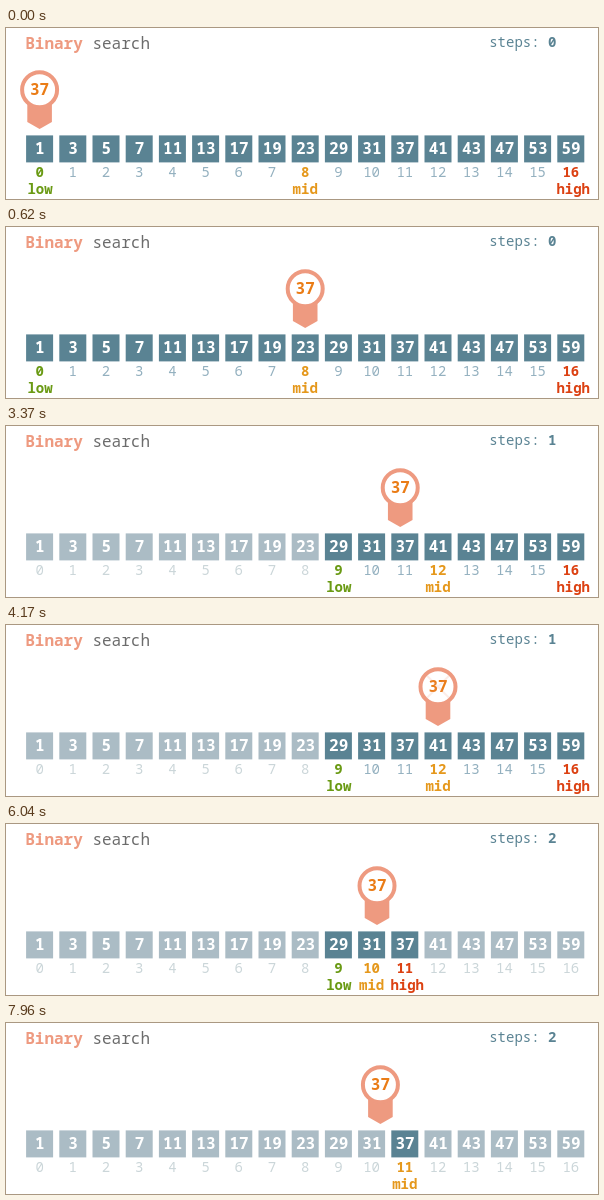
These frames come from a looping animation (592x171 px, 8000 ms). An HTML page:

```html
<!DOCTYPE html>
<html lang="en">
<head>
<meta charset="utf-8">
<title>Binary search</title>
<style>
  html, body { margin: 0; width: 100%; height: 100%; overflow: hidden; background: #fff; }
  svg { display: block; width: 592px; height: 171px; }
  text { font: 14px "Noto Sans Mono", "DejaVu Sans Mono", monospace; white-space: pre; }
  .title { font-size: 16px; fill: #6c6c6c; }
  .title tspan { font-weight: 700; fill: #ee9a80; }
  .steps { fill: #5a8393; }
  .steps tspan { font-weight: 600; }
  .cell rect { fill: #5a8393; }
  .cell text, .pin text { font-size: 16px; font-weight: 600; text-anchor: middle; }
  .cell .value { fill: #fff; }
  .cell .index, .label { font-size: 14px; font-weight: 400; text-anchor: middle; fill: #93b0bf; }
  .cell.off rect { fill: #abbcc5; }
  .cell.off .index { fill: #cbd6d9; }
  .cell.low .index, .cell.mid .index, .cell.high .index, .label { font-weight: 700; }
  .cell.low .index, .label.low { fill: #6a9a14; }
  .cell.high .index, .label.high { fill: #dc4112; }
  .cell.mid .index, .label.mid { fill: #e5981c; }
  .pin text { fill: #ea7c16; }
  .pin .tail { fill: #ee9a80; }
  .pin circle { fill: #fff; stroke: #ee9a80; stroke-width: 4; }
  .pin .cross { stroke: #ee9a80; stroke-width: 2; }
</style>
</head>
<body>
<svg viewBox="0 0 592 171">
  <text class="title" x="19.2" y="21"><tspan>Binary</tspan> search</text>
  <text class="steps" x="483.2" y="19">steps: <tspan id="count">0</tspan></text>
  <g id="cells"></g>
  <g id="labels"></g>
  <g class="pin" id="pin">
    <path class="tail" d="M-12.3 74H12.3V94L0 101L-12.3 94Z"/>
    <circle cy="61.7" r="17.5"/>
    <text y="67.4">37</text>
    <path class="cross" id="cross" d="M-11 50.7L11 72.7M11 50.7L-11 72.7"/>
  </g>
</svg>
<script>
const LOOP = 8000, FPS = 24;
const values = [1, 3, 5, 7, 11, 13, 17, 19, 23, 29, 31, 37, 41, 43, 47, 53, 59];

// Each state takes over at its frame.
const states = [
  { at: 0, steps: 0, low: 0, mid: 8, high: 16 },
  { at: 39, steps: 1, low: 9, mid: 12, high: 16 },
  { at: 110, steps: 2, low: 9, mid: 10, high: 11 },
  { at: 170, steps: 2, low: 11, mid: 11, high: 11 }
];
const moves = [
  { at: 0, length: 15, from: 0, to: 8 },
  { at: 74, length: 15, from: 8, to: 12 },
  { at: 135, length: 14, from: 12, to: 10 },
  { at: 189, length: 14, from: 10, to: 11 }
];
const crosses = [
  { at: 29, length: 10 },
  { at: 99, length: 11 },
  { at: 159, length: 11 }
];

const byId = id => document.getElementById(id);
const centre = i => 33.6 + 33.2 * i;
const easeOut = p => 1 - (1 - p) ** 2;
const latest = (list, frame) => list.filter(item => item.at <= frame).pop();

function add(parent, tag, attrs, text = "") {
  const node = document.createElementNS("http://www.w3.org/2000/svg", tag);
  for (const key in attrs) node.setAttribute(key, attrs[key]);
  node.textContent = text;
  return parent.appendChild(node);
}

const cells = values.map((value, i) => {
  const cell = add(byId("cells"), "g", { class: "cell" });
  const x = centre(i);
  add(cell, "rect", { x: x - 13.5, y: 107.4, width: 27, height: 27 });
  add(cell, "text", { class: "value", x: x + 0.3, y: 126.4 }, value);
  add(cell, "text", { class: "index", x, y: 149.4 }, i);
  return cell;
});
const shifts = { low: 0.4, mid: 0, high: 2.4 };
const labels = {};
for (const name in shifts) {
  labels[name] = add(byId("labels"), "text", { class: "label " + name, y: 166 }, name);
}

let shown = null;
function showState(state) {
  if (state === shown) return;
  shown = state;
  const { low, mid, high } = state;
  byId("count").textContent = state.steps;
  cells.forEach((cell, i) => {
    const role = i === mid ? "mid" : i === low ? "low" : i === high ? "high" : "";
    cell.setAttribute("class", `cell ${role} ${i < low || i > high ? "off" : ""}`);
  });
  for (const name in labels) {
    const hidden = name !== "mid" && state[name] === mid;
    labels[name].setAttribute("x", centre(state[name]) + shifts[name]);
    labels[name].setAttribute("visibility", hidden ? "hidden" : "visible");
  }
}

function draw(time) {
  const frame = Math.floor((time % LOOP + 5.1) * FPS / 1000) % (LOOP * FPS / 1000);
  showState(latest(states, frame));

  const move = latest(moves, frame);
  const p = easeOut(Math.min(1, (frame - move.at) / move.length));
  const x = centre(move.from + (move.to - move.from) * p);
  byId("pin").setAttribute("transform", `translate(${x.toFixed(2)} 0)`);

  const cross = crosses.find(c => frame > c.at && frame < c.at + c.length);
  byId("cross").setAttribute("opacity", cross ? easeOut((frame - cross.at) / cross.length) : 0);
}

const start = performance.now();
function tick() {
  draw(performance.now() - start);
  requestAnimationFrame(tick);
}
tick();
</script>
</body>
</html>
```
